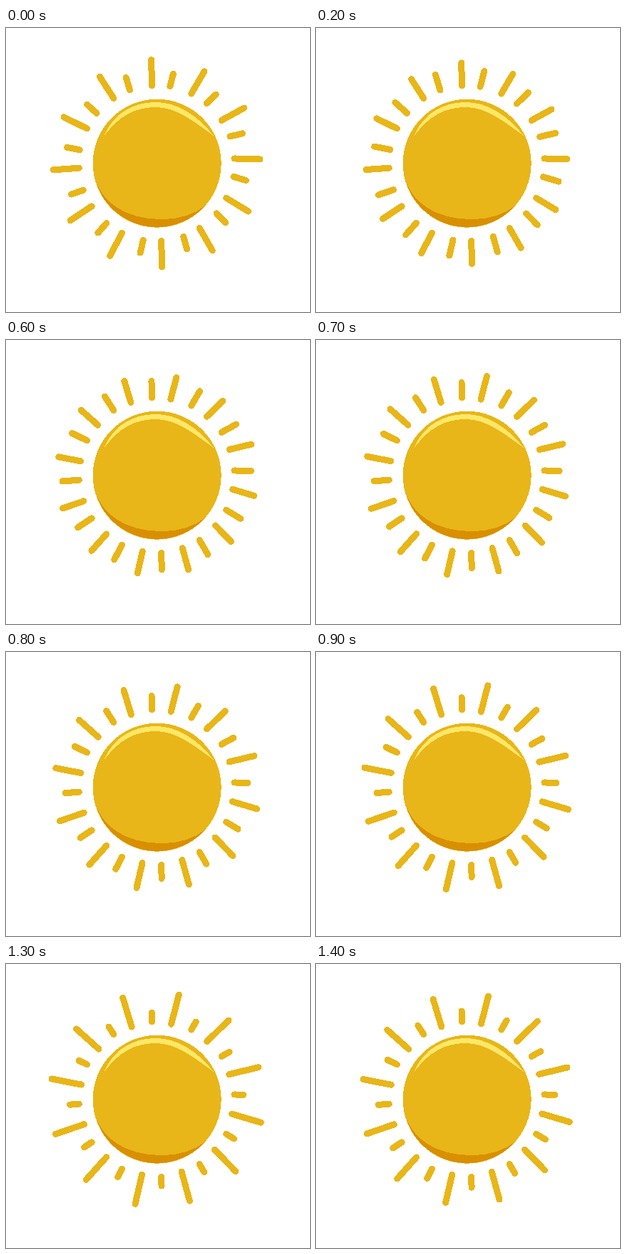
These frames come from a looping animation (426 px wide and 398 px high, 1500 ms). An HTML page:

```html
<!DOCTYPE html>
<html lang="en">
<head>
<meta charset="utf-8">
<title>Shining sun</title>
<style>
  html, body { margin: 0; width: 100%; height: 100%; overflow: hidden; background: #fff; }
  svg { display: block; width: 426px; height: 398px; }
</style>
</head>
<body>
<svg viewBox="0 0 426 398" shape-rendering="crispEdges">
  <path id="rays" fill="none" stroke="#e8b618" stroke-width="9" stroke-linecap="round"/>
  <circle cx="211.7" cy="189.7" r="90" fill="#e8b618"/>
  <path fill="#ffe767" d="M138 150.5C150 120 178 104 210 104C240 104 268 122 291 151C262 130 238 111 210 111C180 111 158 124 138 150.5Z"/>
  <path fill="#d98f02" d="M126 216C138 246 168 267 215 268C240 269 262 262 278 250A90 90 0 0 1 126 216Z"/>
</svg>
<script>
const LOOP = 1500, STEP = 100, PEAK = 1200, COUNT = 24;
const CX = 211.1, CY = 189.6;
const rays = document.getElementById('rays');

const mix = (a, b, k) => a + (b - a) * k;

// Step from a point along a clockwise angle in degrees, with 0 pointing up
function move([x, y], degrees, distance) {
  const a = degrees * Math.PI / 180;
  return [x + distance * Math.sin(a), y - distance * Math.cos(a)];
}

function ray(i, k) {
  const angle = i * 360 / COUNT;
  const grows = i % 2 === 1;
  const length = grows ? mix(18, 42.4, k) : mix(36.2, 12.7, k);
  const radius = grows ? mix(109.5, 107.4, k) : 109;
  const twist = grows ? mix(-5.1, -4, k) : -3.5;
  const lean = 2.85 * Math.sin(angle * Math.PI / 180) - 1.2;
  const base = move([CX, CY], angle + twist, radius);
  return `M${base}L${move(base, angle + lean, length)}`;
}

function draw(now) {
  const t = Math.floor(now % LOOP / STEP) * STEP;
  const k = Math.min(t, 2 * PEAK - t) / 1100;
  rays.setAttribute('d', Array.from({ length: COUNT }, (_, i) => ray(i, k)).join(''));
}

const start = performance.now();
function tick() {
  draw(performance.now() - start);
  requestAnimationFrame(tick);
}
tick();
</script>
</body>
</html>
```
